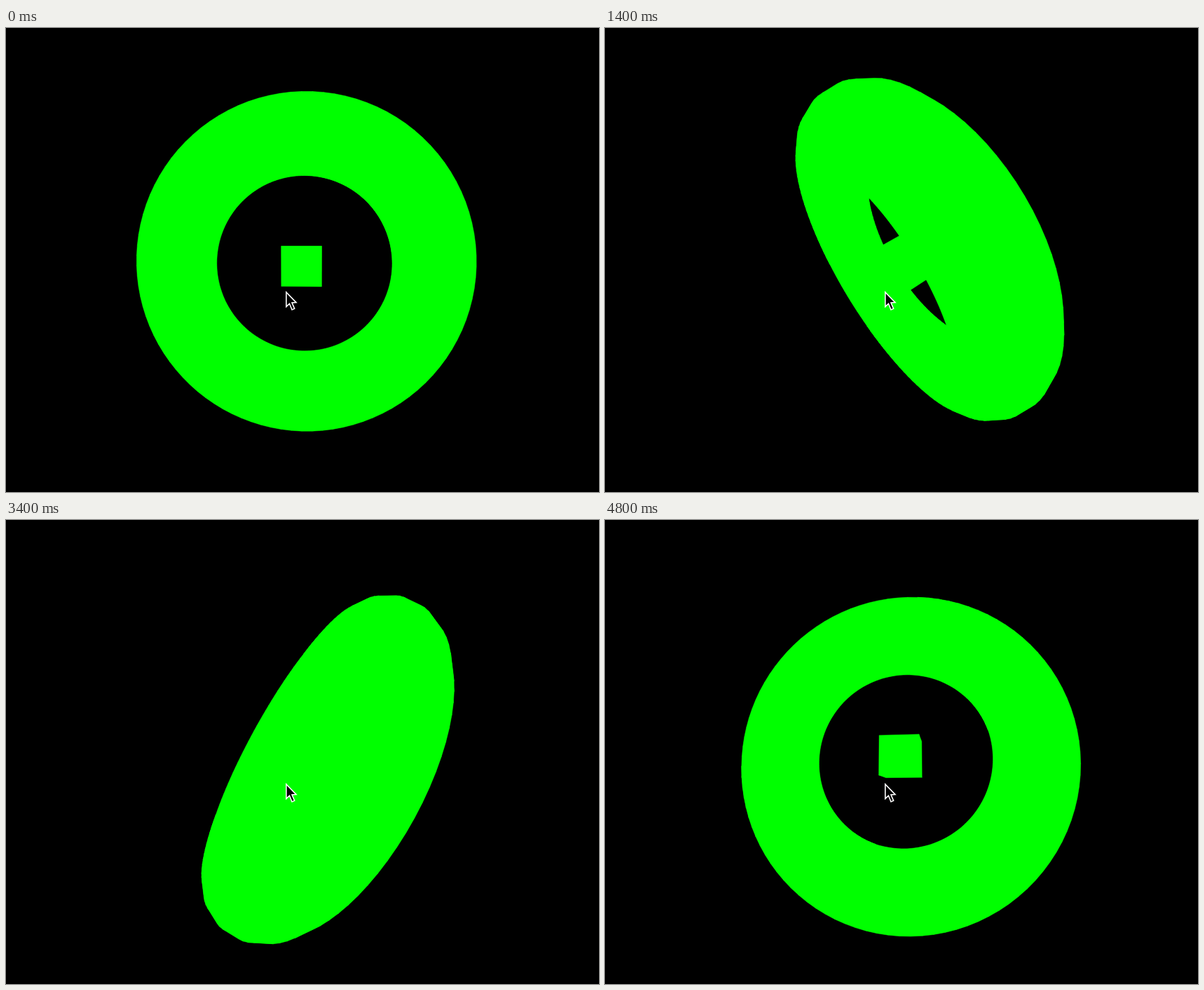
An HTML page with a canvas that plays this animation: 846 px wide and 662 px high, repeating every 5000 ms.

```html
<!DOCTYPE html>
<html lang="en">
<head>
<meta charset="utf-8">
<title>Ring and cube</title>
<style>
  html, body { margin: 0; width: 100%; height: 100%; overflow: hidden; background: #000; }
  canvas { display: block; }
</style>
</head>
<body>
<canvas id="stage" width="846" height="662"></canvas>
<script>
const ctx = document.getElementById('stage').getContext('2d');
const LOOP = 5000, STEP = 200;
const START = 0.053, SPEED = 0.6165;          // radians, radians per second
const CX = 423, CY = 338.5, FOCAL = 453, CAMERA = 25;
const RING = 10, TUBE = 3, AROUND = 100, ACROSS = 16, HALF = 1.5;
const GREEN = '#0f0';

// Quads are listed counter-clockwise as seen from outside.
function ringFaces() {
  const point = (i, j) => {
    const u = i / AROUND * 2 * Math.PI, v = j / ACROSS * 2 * Math.PI;
    const r = RING + TUBE * Math.cos(v);
    return [r * Math.cos(u), r * Math.sin(u), TUBE * Math.sin(v)];
  };
  const faces = [];
  for (let i = 0; i < AROUND; i++)
    for (let j = 0; j < ACROSS; j++)
      faces.push([point(i, j), point(i + 1, j), point(i + 1, j + 1), point(i, j + 1)]);
  return faces;
}

function cubeFaces() {
  const faces = [];
  for (let axis = 0; axis < 3; axis++)
    for (const side of [-1, 1]) {
      const face = [[-1, -1], [1, -1], [1, 1], [-1, 1]].map(([a, b]) => {
        const p = [0, 0, 0];
        p[axis] = side * HALF;
        p[(axis + 1) % 3] = a * HALF;
        p[(axis + 2) % 3] = b * HALF;
        return p;
      });
      faces.push(side > 0 ? face : face.reverse());
    }
  return faces;
}

const solids = [ringFaces(), cubeFaces()];

// Equal turns about the y and x axes, then perspective.
function projector(angle) {
  const c = Math.cos(angle), s = Math.sin(angle);
  return ([x, y, z]) => {
    const x1 = x * c - z * s, z1 = x * s + z * c;
    const y2 = y * c - z1 * s, z2 = y * s + z1 * c;
    const k = FOCAL / (CAMERA - z2);
    return [CX + x1 * k, CY - y2 * k];
  };
}

function facesViewer([a, b, c, d]) {
  return (c[0] - a[0]) * (d[1] - b[1]) - (c[1] - a[1]) * (d[0] - b[0]) < 0;
}

function trace(points) {
  points.forEach(([x, y], i) => i ? ctx.lineTo(x, y) : ctx.moveTo(x, y));
  ctx.closePath();
}

function drawSolid(faces, project) {
  ctx.beginPath();
  for (const face of faces) {
    const flat = face.map(project);
    if (facesViewer(flat)) trace(flat);
  }
  ctx.fillStyle = ctx.strokeStyle = GREEN;
  ctx.lineWidth = 0.5;
  ctx.fill();
  ctx.stroke();
}

function drawPointer() {
  ctx.beginPath();
  trace([[399.8, 377], [399.8, 397.6], [404.4, 393.3], [408, 402],
         [411.6, 400.4], [408, 392], [414, 391.6]]);
  ctx.fillStyle = '#000';
  ctx.strokeStyle = '#fff';
  ctx.lineWidth = 1.6;
  ctx.fill();
  ctx.stroke();
}

function draw(ms) {
  const t = Math.floor(ms % LOOP / STEP) * STEP / 1000;
  const project = projector(START + SPEED * t);
  ctx.fillStyle = '#000';
  ctx.fillRect(0, 0, 846, 662);
  for (const faces of solids) drawSolid(faces, project);
  drawPointer();
}

const begin = performance.now();
function tick() {
  draw(performance.now() - begin);
  requestAnimationFrame(tick);
}
tick();
</script>
</body>
</html>
```
